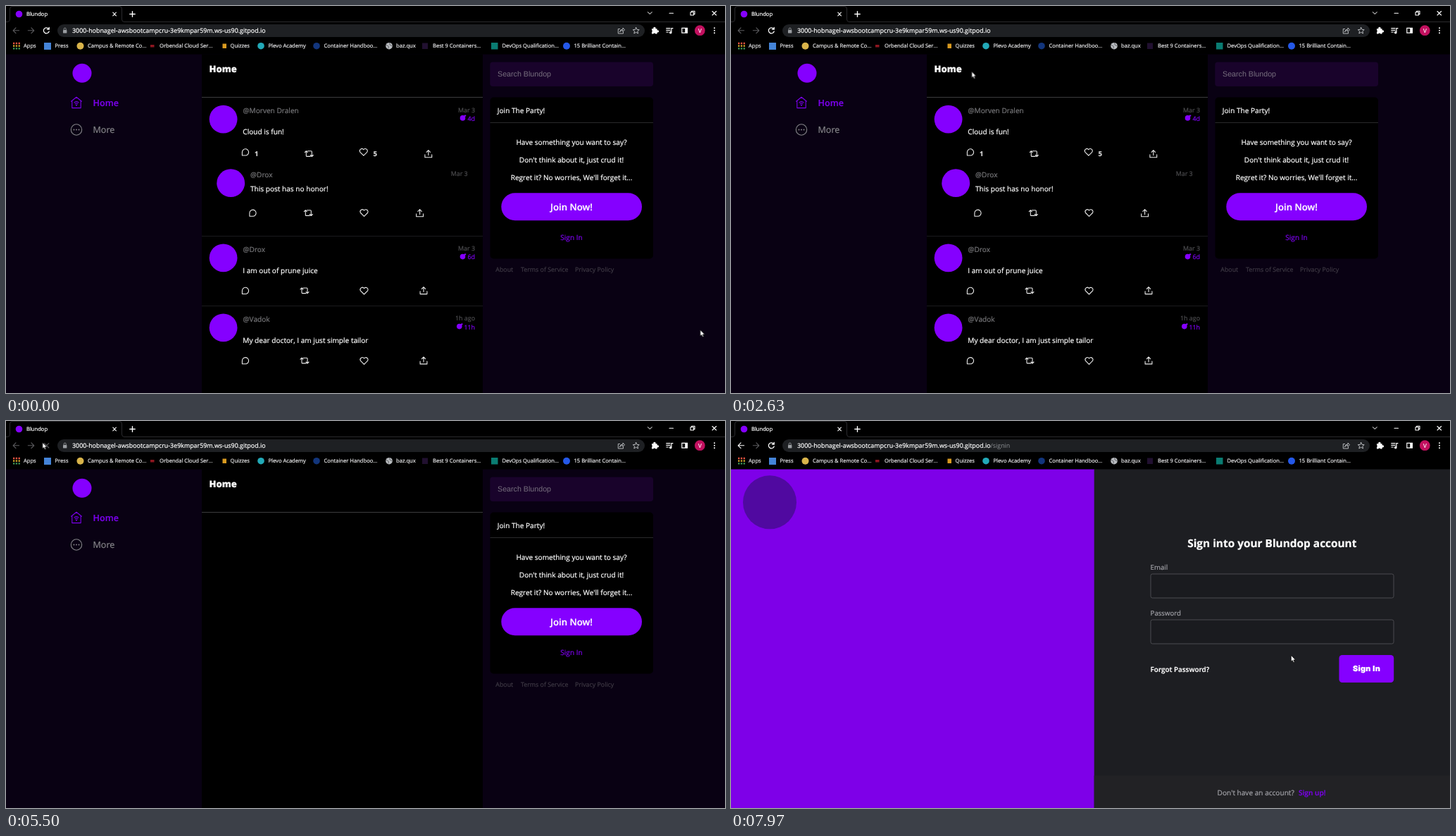
An HTML page for the animation above (8000 ms loop, 1021 px wide and 549 px high).

```html
<!DOCTYPE html>
<html lang="en">
<head>
<meta charset="utf-8">
<title>Blundop</title>
<style>
  :root { --violet: #8500ff; --link: #7a00ea; --dim: #86868a; }
  html, body { margin: 0; width: 100%; height: 100%; overflow: hidden; background: #000; }
  svg { display: block; width: 1021px; height: 549px; }
  text {
    font: 10.1px "Open Sans", "Noto Sans", sans-serif; color: #fff;
    fill: currentColor; stroke: currentColor; stroke-width: .22px;
    text-rendering: geometricPrecision; white-space: pre;
  }
  .mid { text-anchor: middle; }
  .end text { text-anchor: end; font-size: 8.9px; color: #4c4c4f; }
  .end text.life { color: var(--link); }
  .marks text { font-size: 7.6px; color: #e4e4e6; }
  .foot text { font-size: 8.85px; color: #3d3843; }
  text.user { color: #77777a; }
  text.count { font-size: 9.6px; font-weight: 700; color: #d8d8d8; }
  text.label { font-size: 9.65px; color: #a2a2a8; }
  text.link { color: var(--link); }
  .line { fill: none; stroke: #fff; stroke-width: 1.1; stroke-linecap: round; stroke-linejoin: round; }
  .icons { stroke: #ececec; }
  .grey { stroke: #5c5c5f; }
  .violet { fill: var(--violet); }

  .show, .hide { animation: 8s step-end infinite; }
  .posts { animation-name: posts; }
  .after-click { animation-name: after-click; }
  .before-click { animation-name: before-click; }
  .home { animation-name: home; }
  .signin { animation-name: signin; }
  .reload { animation-name: reload; }
  .stop { animation-name: stop; }
  .favicon { animation-name: favicon; }
  .spinner { animation-name: spinner; }
  .arc { animation: turn .8s linear infinite; }
  .cursor { animation: travel 8s linear infinite; }

  @keyframes posts { 0%, 71.5% { visibility: visible } 67.5% { visibility: hidden } }
  @keyframes after-click { 0% { visibility: hidden } 97%, 100% { visibility: visible } }
  @keyframes before-click { 0% { visibility: visible } 97%, 100% { visibility: hidden } }
  @keyframes home { 0% { visibility: visible } 98.75%, 100% { visibility: hidden } }
  @keyframes signin { 0% { visibility: hidden } 98.75%, 100% { visibility: visible } }
  @keyframes reload { 0%, 71.5% { visibility: visible } 62.5% { visibility: hidden } }
  @keyframes stop { 0%, 71.5% { visibility: hidden } 62.5% { visibility: visible } }
  @keyframes favicon { 0%, 67% { visibility: visible } 62.5% { visibility: hidden } }
  @keyframes spinner { 0%, 67% { visibility: hidden } 62.5% { visibility: visible } }
  @keyframes turn { to { transform: rotate(-360deg) } }
  @keyframes travel {
    0% { transform: translate(985.5px, 459px) }
    25.875% { transform: translate(985.5px, 459px); animation-timing-function: cubic-bezier(.4, 0, .5, 1) }
    32.875% { transform: translate(341.5px, 92.5px); animation-timing-function: ease-in }
    35.875% { transform: translate(300px, 93px) }
    41% { transform: translate(130px, 66px); animation-timing-function: ease-out }
    46.25% { transform: translate(72px, 48px) }
    51.25% { transform: translate(69.5px, 44px); animation-timing-function: ease-in-out }
    56.625% { transform: translate(52px, 30px) }
    68% { transform: translate(51.5px, 30px) }
    78% { transform: translate(51.5px, 30px); animation-timing-function: ease-in-out }
    80.3% { transform: translate(823px, 315px) }
    80.875% { transform: translate(818px, 308px) }
    89.25% { transform: translate(818px, 308px); animation-timing-function: ease-in-out }
    91.25%, 100% { transform: translate(795px, 332px) }
  }
</style>
</head>
<body>
<svg viewBox="0 0 1021 549" xmlns="http://www.w3.org/2000/svg">
  <defs>
    <path id="reply" d="M-4.4 4.7V.3A4.6 4.6 0 1 1 .3 4.7Z"/>
    <path id="repost" d="M-2 -3.8H3Q4 -3.8 4 -2.8V3.4M2 1.9 4 3.9 6 1.9M2 3.8H-3Q-4 3.8 -4 2.8V-3.4M-6 -1.9 -4 -3.9-2 -1.9"/>
    <path id="heart" d="M0 5.2-4.9 .3A2.9 2.9 0 0 1 0 -3.2 2.9 2.9 0 0 1 4.9 .3Z"/>
    <path id="share" d="M0 1.8V-5M-2.7 -2.5 0 -5.2 2.7 -2.5M-4.9 1V4.8H4.9V1"/>
    <path id="arrow" d="M4.3 0H-4M-.3 -3.9-4.2 0-.3 3.9"/>
    <g id="bomb">
      <circle cx="-.5" cy=".6" r="3.8"/>
      <path d="M1 -2 2.8 -4.1 4.6 -3 2.6 -.5Z"/>
    </g>
    <g id="row">
      <use href="#reply" x="339.8"/>
      <use href="#repost" x="424"/>
      <use href="#heart" x="508.5"/>
      <use href="#share" x="593"/>
    </g>
  </defs>

  <rect width="1021" height="549"/>

  <!-- Browser tab strip -->
  <path class="line" style="stroke:#37373a;stroke-width:.8" d="M0 22.5H2Q5.5 22.5 5.5 19V4Q5.5 .5 9 .5H161Q164.5 .5 164.5 4V19Q164.5 22.5 168 22.5H1021"/>
  <circle class="violet hide favicon" cx="18.5" cy="11.5" r="4.8"/>
  <g class="show spinner" transform="translate(18.5 11.5)">
    <path class="line arc" style="stroke:#9aa0a6" d="M0 -4.2A4.2 4.2 0 0 1 4.2 0"/>
  </g>
  <text x="29" y="14.2" style="font-size:7.6px">Blundop</text>
  <g class="line">
    <path d="M151.8 9.2 156.4 13.8M156.4 9.2 151.8 13.8"/>
    <path style="stroke-width:1.4" d="M175.8 11.5H183.2M179.5 7.8V15.2"/>
    <path style="stroke:#b5b5b5" d="M911.3 8.6 914.3 11.4 917.3 8.6"/>
    <path d="M942 10.3H947.5M972 8.7H976.4V13H972ZM973.6 8.5V7.2H978V11.6H976.6M1003 7.5 1008.6 13M1008.6 7.5 1003 13"/>
  </g>

  <!-- Toolbar -->
  <rect x="73" y="26" width="834" height="18" rx="9" fill="#1e2023"/>
  <g class="line">
    <use class="grey hide before-click" href="#arrow" transform="translate(14.3 34.8)"/>
    <use class="show after-click" href="#arrow" transform="translate(14.3 34.8)"/>
    <use class="grey" href="#arrow" transform="translate(35.6 34.8) scale(-1 1)"/>
    <path class="hide reload" style="stroke-width:1.3" d="M60.4 32.2A4 4 0 1 0 61.2 36M61.2 30.4V33.2H58.4"/>
    <path class="grey show stop" d="M54.4 31.6 60.8 38M60.8 31.6 54.4 38"/>
  </g>
  <rect x="81" y="34" width="5.4" height="4.6" rx=".7" fill="#9a9da1"/>
  <path class="line" style="stroke:#9a9da1;stroke-width:.9" d="M82.2 34V32.6A1.5 1.5 0 0 1 85.2 32.6V34"/>
  <text x="94" y="38" style="font-size:8.88px">3000-hobnagel-awsbootcampcru-3e9kmpar59m.ws-us90.gitpod.io<tspan class="show after-click" fill="#8f9296" stroke="none">/signin</tspan></text>
  <g class="line" style="stroke:#c4c7ca;stroke-width:.9">
    <path d="M871.5 32.5H869.3V39H876.5V37M871.5 36.5Q872 33 876 33V31L878.5 33.8 876 36.4V34.6Q873 34.5 871.5 36.5Z"/>
    <path d="M894.7 30.4 896 33.4 899.2 33.7 896.8 35.8 897.6 39 894.7 37.3 891.8 39 892.6 35.8 890.2 33.7 893.4 33.4Z"/>
  </g>
  <g fill="#fff">
    <path d="M917 32.2H919.4A1.7 1.7 0 1 1 922.4 32.2H924.6V34.4A1.7 1.7 0 1 1 924.6 37.4V39.5H922.2A1.5 1.5 0 0 0 919.4 39.5H917V36.9A1.5 1.5 0 0 0 917 34.3Z"/>
    <path d="M937.3 31H943.5V32.2H937.3ZM937.3 33.7H943.5V34.9H937.3ZM937.3 36.4H941V37.6H937.3ZM944.3 31H947.4V32.3H945.5V37.6A1.8 1.8 0 1 1 944.3 36Z"/>
    <path fill-rule="evenodd" d="M959.2 30.8H968V38.8H959.2ZM960.4 32V37.6H964.2V32Z"/>
    <circle cx="1006" cy="31.2" r="1"/><circle cx="1006" cy="34.7" r="1"/><circle cx="1006" cy="38.2" r="1"/>
  </g>
  <circle cx="985.3" cy="34.7" r="7.4" fill="#c2105f"/>
  <text class="mid" x="985.3" y="37.6" style="font-size:8px">V</text>

  <!-- Bookmarks -->
  <g class="marks">
    <g fill="none" stroke-width="2.3" stroke-dasharray="2.3 1.5">
      <path stroke="#e5533f" d="M10 53H20"/>
      <path stroke="#d9a92b" d="M10 56.7H20"/>
      <path stroke="#3f9b58" d="M10 60.4H20"/>
    </g>
    <text x="25" y="59.2">Apps</text>
    <rect x="54" y="52" width="10" height="10" fill="#4484d8"/>
    <text x="69.5" y="59.2">Press</text>
    <circle cx="105.5" cy="56.7" r="5" fill="#d9b44a"/>
    <text x="116" y="59.2">Campus &amp; Remote Co...</text>
    <rect x="205" y="55" width="5.5" height="3.5" fill="#8d1620"/>
    <text x="218" y="59.2">Orbendal Cloud Ser...</text>
    <rect x="307.5" y="53.5" width="5.5" height="6.5" fill="#d99a20"/>
    <text x="318.5" y="59.2">Quizzes</text>
    <circle cx="362" cy="56.7" r="4.8" fill="#22a9b8"/>
    <text x="372.5" y="59.2">Plevo Academy</text>
    <circle cx="441" cy="56.7" r="4.8" fill="#12357c"/>
    <text x="451.5" y="59.2">Container Handboo...</text>
    <circle cx="544" cy="56.7" r="4.8" fill="#b9bcc0"/>
    <path class="line" style="stroke:#4a4c50;stroke-width:.8" d="M540 55.3 543.3 57.2 543 60M544.5 52.7 545.4 55.4 548 56.6"/>
    <text x="554" y="59.2">baz.qux</text>
    <rect x="591" y="52.5" width="8" height="8.5" fill="#211030"/>
    <text x="606" y="59.2">Best 9 Containers...</text>
    <rect x="689" y="52" width="9.5" height="9.5" fill="#0a7c72"/>
    <text x="704.5" y="59.2">DevOps Qualification...</text>
    <circle cx="796" cy="56.7" r="5" fill="#2458e8"/>
    <text x="806.5" y="59.2">15 Brilliant Contain...</text>
  </g>

  <!-- Home page -->
  <g class="hide home">
    <rect y="68.5" width="1021" height="480.5" fill="#090113"/>
    <rect x="278" y="68.5" width="399" height="480.5"/>

    <circle class="violet" cx="108" cy="95.3" r="13.5"/>
    <g class="line" style="stroke:var(--link)">
      <path d="M92.6 135.2 100 129.3 107.4 135.2M93.8 134.5V144.6H106.2V134.5M97 137Q100 134.2 103 137M98.3 138.8Q100 137.3 101.7 138.8"/>
      <circle cx="100" cy="140.8" r=".5"/>
    </g>
    <text class="link" x="123.5" y="141.6" style="font-size:12.6px;font-weight:600">Home</text>
    <circle class="line" style="stroke:var(--dim)" cx="100" cy="175.5" r="7.7"/>
    <path class="line" style="stroke:var(--dim);stroke-width:1.9" d="M96.5 175.5h.01M100 175.5h.01M103.5 175.5h.01"/>
    <text x="123.5" y="180.4" style="font-size:12.6px;color:var(--dim)">More</text>

    <text x="288.5" y="94" style="font-size:13px;font-weight:800">Home</text>
    <path d="M278 129.5H677" stroke="#3c3c3e"/>

    <rect x="687.3" y="79.5" width="231.7" height="34.5" rx="4" fill="#19032b"/>
    <text x="698" y="100.4" style="font:10.7px 'Liberation Sans',Arial,sans-serif;color:#77707e;stroke:none">Search Blundop</text>

    <rect x="687.5" y="129.5" width="231.5" height="229" rx="5"/>
    <path d="M687.5 165.5H919" stroke="#29292b"/>
    <text x="697.8" y="152.3">Join The Party!</text>
    <g class="mid">
      <text x="803" y="196.6">Have something you want to say?</text>
      <text x="803" y="221.8">Don't think about it, just crud it!</text>
      <text x="803" y="246.8">Regret it? No worries, We'll forget it...</text>
      <rect class="violet" x="703.3" y="265.3" width="199.7" height="39" rx="19.5"/>
      <text x="803" y="290.3" style="font-size:13.2px;font-weight:600">Join Now!</text>
      <text class="link" x="803" y="332">Sign In</text>
    </g>
    <g class="foot">
      <text x="695.3" y="376.9">About</text>
      <text x="731" y="376.9">Terms of Service</text>
      <text x="808" y="376.9">Privacy Policy</text>
    </g>
  </g>

  <!-- Feed -->
  <g class="hide home"><g class="hide posts">
    <path d="M278 326.5H677M278 425.5H677" stroke="#1a1a1e"/>
    <g class="violet">
      <circle cx="308.6" cy="160.6" r="19.9"/>
      <circle cx="319.2" cy="251.2" r="19.9"/>
      <circle cx="308.6" cy="357.3" r="19.9"/>
      <circle cx="308.6" cy="456.4" r="19.9"/>
      <use href="#bomb" x="649" y="158.3"/>
      <use href="#bomb" x="649" y="355"/>
      <use href="#bomb" x="644.3" y="454"/>
    </g>
    <g class="end">
      <text x="666" y="150.6">Mar 3</text>
      <text x="666" y="162.8" class="life">4d</text>
      <text x="655.7" y="241.4">Mar 3</text>
      <text x="666" y="347.2">Mar 3</text>
      <text x="666" y="359.4" class="life">6d</text>
      <text x="666" y="446.4">1h ago</text>
      <text x="666" y="458.6" class="life">11h</text>
    </g>
    <text class="user" x="336.5" y="152.4">@Morven Dralen</text>
    <text x="336.3" y="182">Cloud is fun!</text>
    <text class="user" x="347" y="242.8">@Drox</text>
    <text x="347" y="262.6">This post has no honor!</text>
    <text class="user" x="336.5" y="349">@Drox</text>
    <text x="336.3" y="378.8">I am out of prune juice</text>
    <text class="user" x="336.5" y="448.2">@Vadok</text>
    <text x="336.3" y="478">My dear doctor, I am just simple tailor</text>
    <text class="count" x="353" y="212.5">1</text>
    <text class="count" x="521.5" y="212.5">5</text>
    <g class="line icons">
      <use href="#reply" x="339.8" y="207.3"/>
      <use href="#repost" x="430.3" y="209.6"/>
      <use href="#heart" x="507.8" y="207"/>
      <use href="#share" x="599.8" y="209.9"/>
      <use href="#reply" x="350.3" y="293.6"/>
      <use href="#repost" x="429.3" y="293.6"/>
      <use href="#heart" x="508.5" y="293.2"/>
      <use href="#share" x="587.6" y="293.9"/>
      <use href="#row" y="403.8"/>
      <use href="#row" y="503.1"/>
    </g>
  </g></g>

  <!-- Sign-in page -->
  <g class="show signin">
    <rect y="68.5" width="516" height="480.5" fill="#7e00e8"/>
    <circle cx="55" cy="115.3" r="38" fill="#5009a0"/>
    <rect x="515.7" y="68.5" width="505.3" height="480.5" fill="#1d1e22"/>
    <rect x="515.7" y="503" width="505.3" height="46" fill="#222225"/>
    <text class="mid" x="768.3" y="179" style="font-size:15.4px;font-weight:700">Sign into your Blundop account</text>
    <text class="label" x="595.6" y="210.9">Email</text>
    <text class="label" x="595.6" y="275.9">Password</text>
    <g fill="#1a1b1f" stroke="#4b4b50">
      <rect x="596" y="217" width="345" height="34" rx="2.5"/>
      <rect x="596" y="282" width="345" height="34" rx="2.5"/>
    </g>
    <text x="595.6" y="356" style="font-size:9.9px;font-weight:600">Forgot Password?</text>
    <rect class="violet" x="863.5" y="332" width="77.7" height="39" rx="4.5"/>
    <text class="mid" x="902.5" y="355.3" style="font:900 10.9px Inter,Arial,sans-serif;letter-spacing:.3px">Sign In</text>
    <text x="690.6" y="530.8" style="color:#a2a2a8">Don't have an account?</text>
    <text class="link" x="806" y="530.8" style="font-weight:600">Sign up!</text>
  </g>

  <path class="cursor" fill="#fff" stroke="#000" stroke-width=".7" d="M.3 .3V9.3L2.3 7.5 3.7 10.6 5.3 9.9 3.9 6.9H6.6Z"/>
</svg>
</body>
</html>
```
